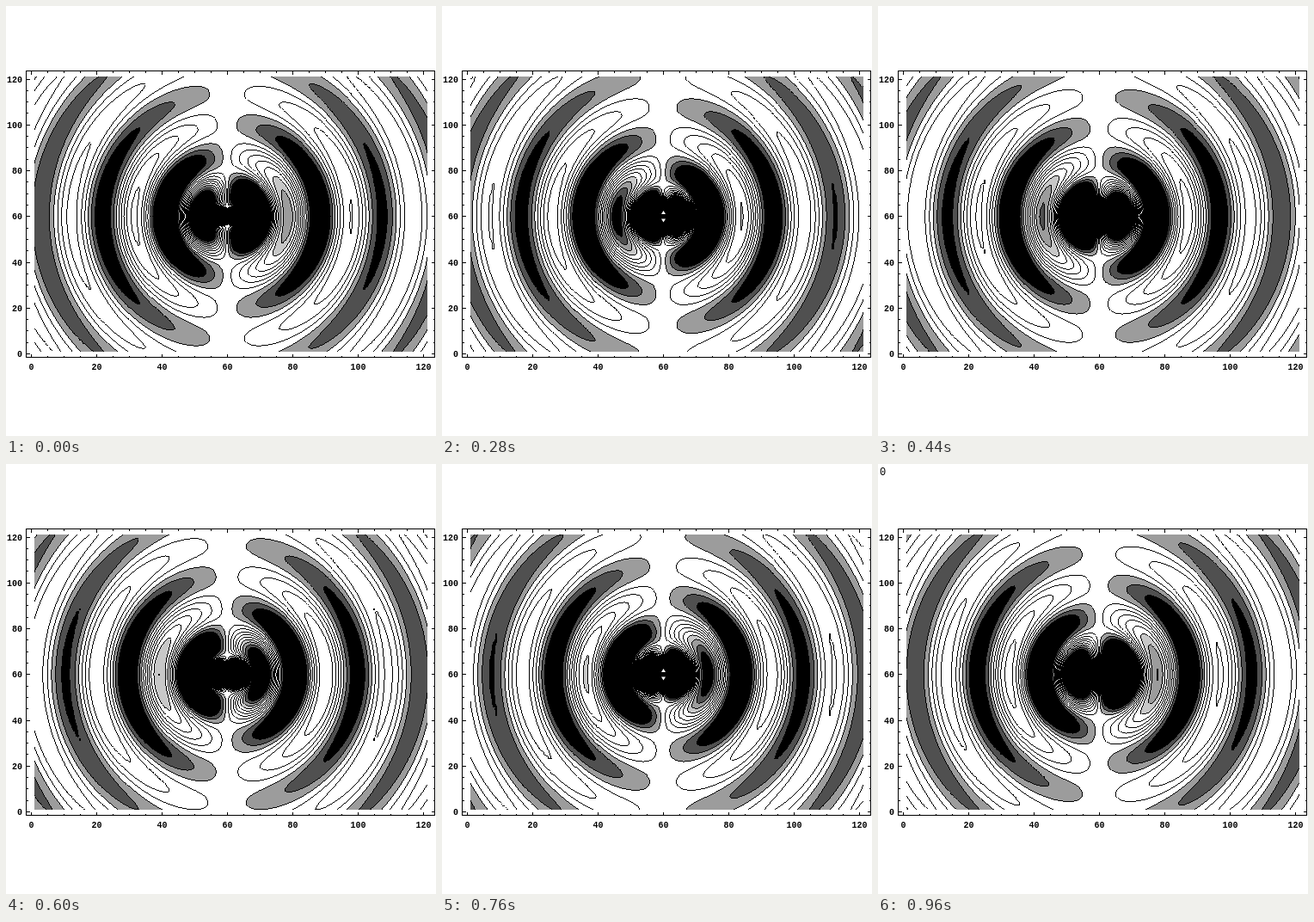
Write an HTML page with a canvas that moves like this. It is 500x500 px and loops after 1000 ms.

```html
<!DOCTYPE html>
<html>
<head>
<meta charset="utf-8">
<title>Dipole wave contours</title>
<style>
  html, body { margin: 0; width: 100%; height: 100%; overflow: hidden; background: #fff; }
  canvas, svg { position: absolute; left: 0; top: 0; width: 500px; height: 500px; display: block; }
  text { font: bold 10px "Liberation Mono", "Courier New", monospace; fill: #000; }
  #label { font: 12px "Liberation Mono", "Courier New", monospace; }
</style>
</head>
<body>
<canvas id="field" width="500" height="500"></canvas>
<svg viewBox="0 0 500 500" xmlns="http://www.w3.org/2000/svg">
  <g id="core" fill="#fff">
    <path d="M257.5 238L260 242H255Z"/>
    <path d="M255 247.500H260L257.500 251.500Z"/>
  </g>
  <path id="axes" fill="none" stroke="#000" shape-rendering="crispEdges"/>
  <g id="numbers"></g>
  <text id="label" x="2" y="13">0</text>
</svg>
<script>
const STEPS = 25, STEP_MS = 40;
const UX = 3.8, UY = 2.6625;          // pixels per axis unit
const X0 = 29, Y0 = 404;              // axis origin on the stage
const MID = 60, SIZE = 122;           // source position, sample grid
const LEFT = 33, TOP = 82, W = 457, H = 320;
const K = 2 * Math.PI / 71.63;        // wave number per pixel
const STRENGTH = 515;                 // amplitude in contour steps

const $ = id => document.getElementById(id);
const ctx = $('field').getContext('2d');

// Outgoing dipole wave: x-derivative of sin(kr - wt) / r
function wave(dx, dy, phase) {
  const r = Math.hypot(dx, dy);
  if (r < 0.01) return 0;
  const u = K * r - phase;
  return STRENGTH * dx / r * (Math.cos(u) / r - Math.sin(u) / (K * r * r));
}

function shade(level) {
  if (level <= -3 || level >= 9) return 0;
  if (level === -2 || level === 8) return 80;
  if (level === -1 || level === 7) return 156;
  return level === 6 ? 200 : 255;
}

// Linear interpolation of the sampled wave, one value per pixel
function sample(phase) {
  const grid = new Float64Array(SIZE * (SIZE + 1));
  for (let j = 0; j <= SIZE; j++)
    for (let i = 0; i < SIZE; i++)
      grid[j * SIZE + i] = wave((i - MID) * UX, (j - MID) * UY, phase);

  const out = new Float64Array((W + 1) * (H + 1));
  for (let y = 0; y <= H; y++) {
    const gy = (Y0 - TOP - y) / UY, j = Math.floor(gy), fy = gy - j;
    for (let x = 0; x <= W; x++) {
      const gx = (LEFT + x - X0) / UX, i = Math.min(Math.floor(gx), SIZE - 2), fx = gx - i;
      const a = j * SIZE + i, b = a + SIZE;
      const low = grid[a] + (grid[a + 1] - grid[a]) * fx;
      const high = grid[b] + (grid[b + 1] - grid[b]) * fx;
      out[y * (W + 1) + x] = low + (high - low) * fy;
    }
  }
  return out;
}

function render(phase) {
  const v = sample(phase), img = ctx.createImageData(W, H);
  const level = p => Math.floor(v[p] + 0.5);
  for (let y = 0; y < H; y++) {
    for (let x = 0; x < W; x++) {
      const p = y * (W + 1) + x, right = p + 1, below = p + W + 1;
      const steepX = Math.abs(v[right] - v[p]) > Math.abs(v[below] - v[p]);
      const here = level(p);
      const onLine = here !== level(steepX ? right : below);
      const q = 4 * (y * W + x);
      img.data[q] = img.data[q + 1] = img.data[q + 2] = onLine ? 0 : shade(here);
      img.data[q + 3] = 255;
    }
  }
  return img;
}

function buildAxes() {
  const l = 23.5, r = 498.5, t = 75.5, b = 408.5;
  let d = `M${l} ${t}H${r}V${b}H${l}Z`, numbers = '';
  for (let n = 0; n <= 120; n += 5) {
    const major = n % 20 === 0, len = major ? 4 : 2;
    const x = Math.round(X0 + n * UX) + 0.5, y = Math.round(Y0 - n * UY) + 0.5;
    d += `M${x} ${b}v${-len}M${x} ${t}v${len}M${l} ${y}h${len}M${r} ${y}h${-len}`;
    if (major) {
      numbers += `<text x="${x}" y="423" text-anchor="middle">${n}</text>`;
      numbers += `<text x="19" y="${y + 3}" text-anchor="end">${n}</text>`;
    }
  }
  $('axes').setAttribute('d', d);
  $('numbers').innerHTML = numbers;
}

const cache = [];
let shown = -1;

function draw(ms) {
  const step = Math.floor(ms / STEP_MS) % STEPS;
  if (step !== shown) {
    const phase = (step + 1) % STEPS * 2 * Math.PI / STEPS;
    cache[step] = cache[step] || render(phase);
    ctx.putImageData(cache[step], LEFT, TOP);
    $('core').style.display = Math.abs(Math.sin(phase)) > 0.87 ? '' : 'none';
    $('label').style.display = step === STEPS - 1 ? '' : 'none';
    shown = step;
  }
}

buildAxes();
draw(0);
const start = performance.now();
function tick() {
  draw(performance.now() - start);
  requestAnimationFrame(tick);
}
requestAnimationFrame(tick);
</script>
</body>
</html>
```
